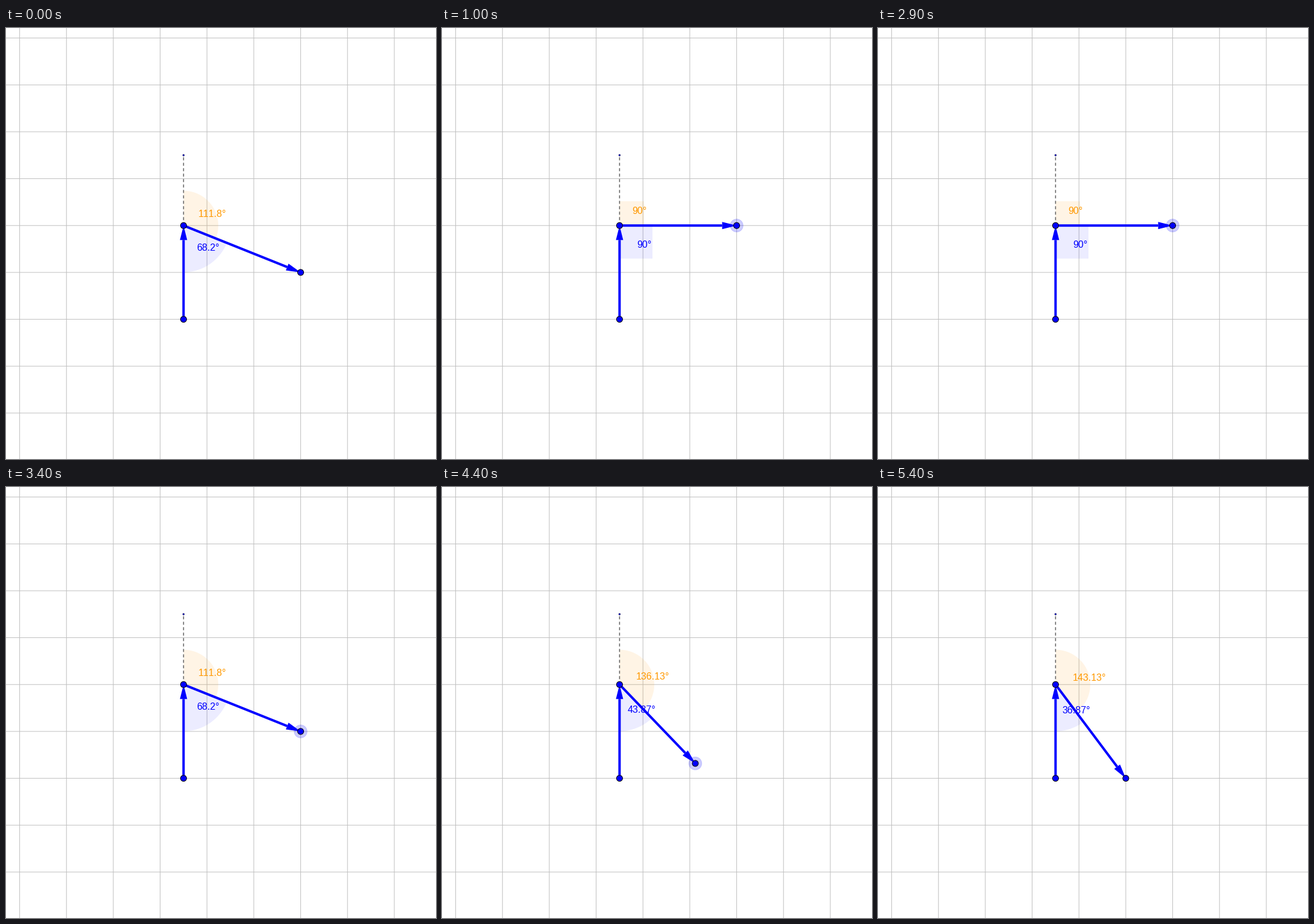
A matplotlib script for the animation above (8 s loop, 713 px wide and 714 px high).

```python
import numpy as np
import matplotlib.pyplot as plt
from matplotlib.animation import FuncAnimation
from matplotlib.patches import Circle, Polygon

W, H, DPI = 713, 714, 100
FRAMES, STEP = 80, 100
PX = 72 / DPI                      # points per pixel
UNIT = 77.66                       # pixels per grid cell
HUB = np.array([294.4, 327.25])    # vertex of both angles
BLUE, ORANGE = "#0000ff", "#ff9900"

# Drags of the free point: first step, last step (ms), goal in cells from the hub
START = (2.5, 1)
DRAGS = [
    (700, 1000, (2.5, 0)),
    (3100, 3400, (2.5, 1)),
    (3600, 3600, (2.47, 1.13)),
    (4100, 4100, (2.3835, 1.2418)),
    (4200, 4400, (1.61734, 1.6824)),
    (4500, 4800, (1.5, 2)),
]
HALO_TIMES = [(500, 1900), (2900, 5400)]

plt.rcParams["text.kerning_factor"] = 6   # labels are set without kerning
fig = plt.figure(figsize=(W / DPI, H / DPI), dpi=DPI, facecolor="white")
ax = fig.add_axes([0, 0, 1, 1])
ax.set(xlim=(0, W), ylim=(H, 0))
ax.axis("off")


def line(a, b, color, width, z, **kw):
    return ax.plot([a[0], b[0]], [a[1], b[1]], color=color, lw=width * PX,
                   zorder=z, solid_capstyle="butt", snap=False, **kw)[0]


def dot(center, r=5, edge=1):
    return ax.add_patch(Circle(center, r, fc=BLUE, ec="black", lw=edge * PX, zorder=6))


class Vector:
    HEAD = 24

    def __init__(self):
        self.shaft = line((0, 0), (0, 0), BLUE, 4, 4)
        self.head = ax.add_patch(Polygon(np.zeros((3, 2)), fc=BLUE, lw=0, zorder=4))

    def set(self, a, b):
        d = (b - a) / np.hypot(*(b - a))
        n = np.array([-d[1], d[0]]) * self.HEAD / 4
        base = b - d * self.HEAD
        self.shaft.set_data([a[0], base[0]], [a[1], base[1]])
        self.head.set_xy([b, base + n, base - n])


class Angle:
    """Sector between a vertical ray (side -1 up, +1 down) and the vector."""

    def __init__(self, side, radius, color, alpha):
        self.side, self.radius = side, radius
        self.area = ax.add_patch(Polygon(np.zeros((3, 2)), fc=color, lw=0,
                                         alpha=alpha, zorder=2))
        self.label = ax.text(0, 0, "", color=color, fontsize=16 * PX,
                             family="Liberation Sans", zorder=7)

    def at(self, t, r):
        return HUB + r * np.stack([np.sin(t), self.side * np.cos(t)], -1)

    def set(self, x, y):
        a = np.arctan2(x, self.side * y)
        if np.isclose(a, np.pi / 2):     # right angles are marked by a square
            s = self.radius / np.sqrt(2)
            pts = [HUB + (u * s, v * s * self.side)
                   for u, v in ((0, 0), (0, 1), (1, 1), (1, 0))]
        else:
            pts = np.vstack([HUB, self.at(np.linspace(0, a, 60), self.radius)])
        self.area.set_xy(pts)
        self.label.set_position(np.floor(self.at(a / 2, self.radius / 1.7) + (-3, 5)))
        self.label.set_text(f"{np.degrees(a):.2f}".rstrip("0").rstrip(".") + "°")


def free_point(t):
    pos = np.array(START, float)
    for first, last, goal in DRAGS:
        p = np.clip((t - first + STEP) / (last - first + STEP), 0, 1)
        pos += (goal - pos) * p * p * (3 - 2 * p)
    return pos


for k in range(9):
    gx, gy = 22.6 + k * UNIT, 16.6 + k * UNIT
    line((gx, 0), (gx, H), "#c0c0c0", 1, 1)
    line((0, gy), (W, gy), "#c0c0c0", 1, 1)

top, foot = HUB - (0, 1.5 * UNIT), HUB + (0, 2 * UNIT)
line(HUB, top, "#606060", 1.5, 3, dashes=(5 / 1.5, 4 / 1.5), dash_capstyle="butt")
outer = Angle(-1, 57.6, ORANGE, .1)
inner = Angle(1, 77.3, BLUE, .075)
Vector().set(foot, HUB)
arm = Vector()
halo = ax.add_patch(Circle(HUB, 10.7, fc=(0, 0, 1, .2), ec=(0, 0, 1, .15),
                           lw=PX, zorder=3.5))
dot(top, 1.4, .5)
dot(foot)
dot(HUB)
tip = dot(HUB)


def draw(i):
    t = i * STEP
    pos = free_point(t)
    end = HUB + UNIT * pos
    outer.set(*pos)
    inner.set(*pos)
    arm.set(HUB, end)
    tip.center = halo.center = end
    halo.set_visible(any(a <= t < b for a, b in HALO_TIMES))
    return []


anim = FuncAnimation(fig, draw, frames=FRAMES, interval=STEP, repeat=True)
plt.show()
```
